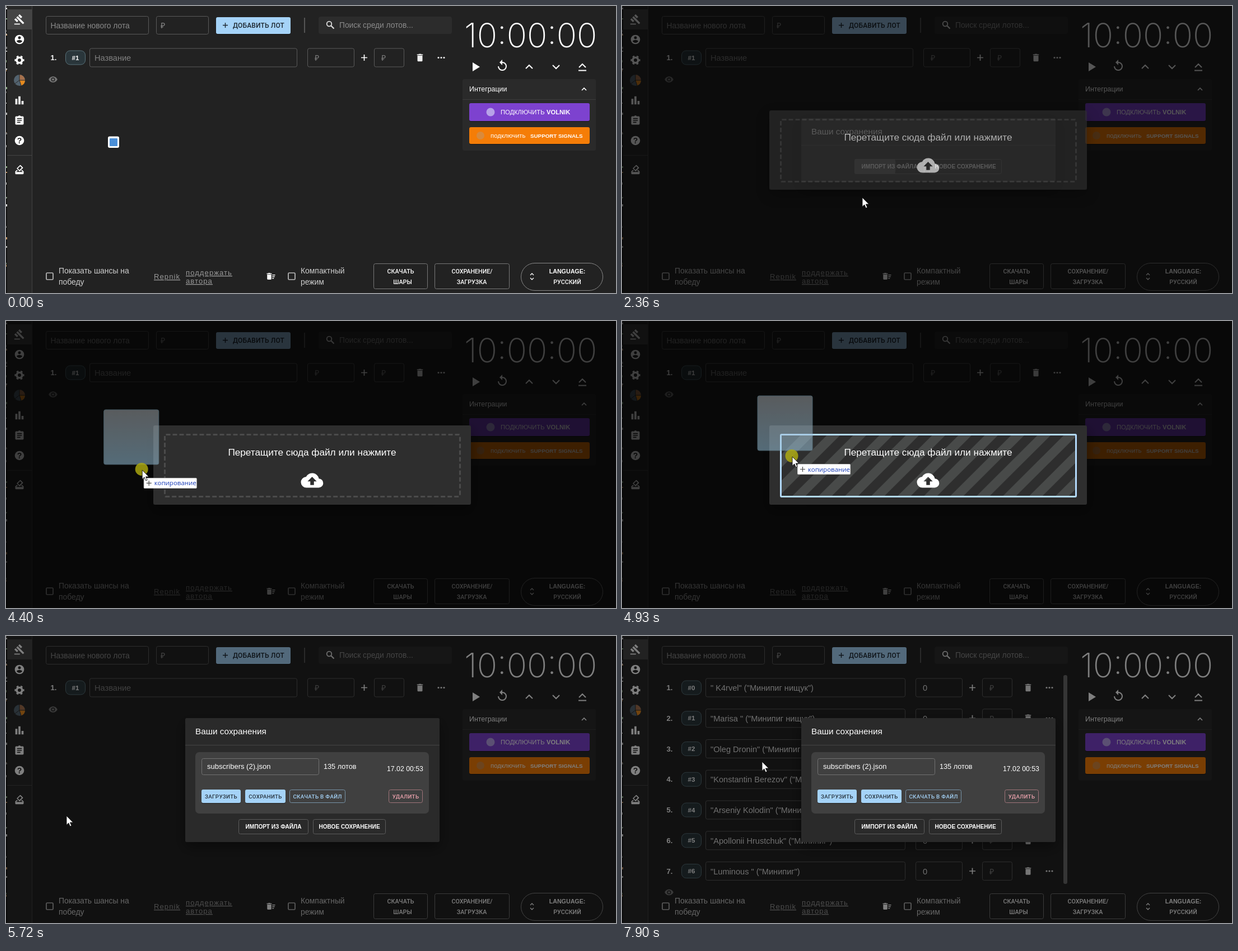
Recreate the animation shown at these times as an HTML page. Size 1089 px wide and 514 px high, loop 8 s.

```html
<!DOCTYPE html>
<html lang="ru">
<head>
<meta charset="utf-8">
<title>Аукцион</title>
<style>
html, body { margin: 0; width: 100%; height: 100%; overflow: hidden; background: #222; }
svg { display: block; width: 1089px; height: 514px; }
text { font-family: "Liberation Sans", Arial, sans-serif; white-space: pre; }
.caps { font-family: Roboto, sans-serif; font-weight: 500; }
.bold { font-weight: 700; }
.thin { font-family: Inter, sans-serif; font-weight: 200; }
.tip { font-family: "Open Sans", sans-serif; }
</style>
</head>
<body>
<svg id="stage" viewBox="0 0 1089 514"></svg>
<script>
const LOOP = 8000;
const BLUE = '#a5d3f8';

// ---------- drawing helpers ----------
const box = (x, y, x2, y2, r, fill, stroke = 'none', more = '') =>
  `<rect x="${x}" y="${y}" width="${x2 - x}" height="${y2 - y}" rx="${r}" fill="${fill}" stroke="${stroke}" ${more}/>`;
const raised = (x, y, x2, y2, fill) =>
  box(x, y + 1.5, x2, y2 + 1.5, 3, '#000', 'none', 'opacity=".3"') + box(x, y, x2, y2, 3, fill);
const frame = (x, y, x2, y2, color = '#5a5a5a', r = 3) =>
  box(x + .5, y + .5, x2 - .5, y2 - .5, r, 'none', color);
const text = (x, y, s, size, fill = '#fff', cls = '', more = '') =>
  `<text x="${x}" y="${y}" font-size="${size}" fill="${fill}" class="${cls}" ${more}>${s}</text>`;
const mid = (x, y, s, size, fill, cls = 'caps', more = '') =>
  text(x, y, s, size, fill, cls, `text-anchor="middle" ${more}`);
const icon = (cx, cy, d, size = 20, fill = '#fff') =>
  `<path transform="translate(${cx - size / 2} ${cy - size / 2}) scale(${size / 24})" d="${d}" fill="${fill}"/>`;
const line = (d, stroke = '#fff', w = 2) =>
  `<path d="${d}" fill="none" stroke="${stroke}" stroke-width="${w}"/>`;
const dot = (x, y, r, fill, more = '') => `<circle cx="${x}" cy="${y}" r="${r}" fill="${fill}" ${more}/>`;
const group = (id, body, more = '') => `<g id="${id}" ${more}>${body}</g>`;
const plus = (x, y, color = '#fff', r = 5.5, w = 1.7) =>
  line(`M${x - r} ${y}h${2 * r}M${x} ${y - r}v${2 * r}`, color, w);

const ICONS = {
  gavel: 'M1 21h12v2H1zM5.2 8.1l2.9-2.9 14.1 14.2-2.8 2.8zM12.3 1l5.7 5.7-2.9 2.8-5.6-5.7zM3.8 9.5l5.7 5.6-2.8 2.9L1 12.3z',
  user: 'M12 2a10 10 0 1 0 0 20 10 10 0 0 0 0-20zm0 3a3 3 0 1 1 0 6 3 3 0 0 1 0-6zm0 14.2c-2.5 0-4.7-1.3-6-3.2 0-2 4-3.1 6-3.1s6 1.1 6 3.1c-1.3 1.9-3.5 3.2-6 3.2z',
  bars: 'M4 9h4v11H4zM10 4h4v16h-4zM16 13h4v7h-4z',
  clip: 'M19 3h-4.2a3 3 0 0 0-5.6 0H5a2 2 0 0 0-2 2v14c0 1.1.9 2 2 2h14a2 2 0 0 0 2-2V5a2 2 0 0 0-2-2zm-5 14H7v-2h7zm3-4H7v-2h10zm0-4H7V7h10z',
  vote: 'M18 13h-.7l-2 2h1.9l1.8 2H5l1.8-2h2l-2-2H6l-3 3v4c0 1.1.9 2 2 2h14a2 2 0 0 0 2-2v-4zm-1-5l-5 5-3.5-3.5 5-5zm-3.8-5.7L6.7 8.8a1 1 0 0 0 0 1.4l5 5c.4.4 1 .4 1.4 0l6.4-6.4a1 1 0 0 0 0-1.4l-5-5a1 1 0 0 0-1.3-.1z',
  trash: 'M6 19c0 1.1.9 2 2 2h8a2 2 0 0 0 2-2V7H6zM19 4h-3.5l-1-1h-5l-1 1H5v2h14z',
  sweep: 'M15 16h4v2h-4zM15 8h7v2h-7zM15 12h6v2h-6zM3 18c0 1.1.9 2 2 2h6a2 2 0 0 0 2-2V8H3zM14 5h-3l-1-1H6L5 5H2v2h12z',
  eye: 'M12 4.5C7 4.5 2.7 7.6 1 12c1.7 4.4 6 7.5 11 7.5s9.3-3.1 11-7.5c-1.7-4.4-6-7.5-11-7.5zM12 17a5 5 0 1 1 0-10 5 5 0 0 1 0 10zm0-8a3 3 0 1 0 0 6 3 3 0 0 0 0-6z',
  cloud: 'M19.4 10A7.5 7.5 0 0 0 5.4 8 6 6 0 0 0 6 20h13a5 5 0 0 0 .4-10zM14 13v4h-4v-4H7l5-5 5 5z',
  replay: 'M12 5V1L7 6l5 5V7a6 6 0 1 1-6 6H4a8 8 0 1 0 8-8z'
};

// ---------- page ----------
function sidebar() {
  const specks = Array.from({ length: 30 }, (_, i) => {
    const y = (i * 37 + (i * i * 13) % 29) % 500;
    return box(0, y, 1 + i % 2, y + 2 + i % 3, 0, ['#bbb', '#c99a6a', '#8fb08a', '#ddd', '#777'][i % 5]);
  }).join('');
  return box(0, 0, 2, 514, 0, '#111') + specks + box(2, 0, 46, 514, 0, '#282828') +
    box(46, 0, 47, 514, 0, '#424242') + box(2, 6, 46, 42, 0, '#444') +
    icon(24, 24, ICONS.gavel) + icon(24, 60, ICONS.user) +
    dot(24, 97, 4.8, 'none', 'stroke="#fff" stroke-width="3.6"') +
    dot(24, 97, 7.4, 'none', 'stroke="#fff" stroke-width="2.4" stroke-dasharray="3.6 4.149" transform="rotate(-14 24 97)"') +
    dot(24, 133, 10, '#53636f') +
    '<path d="M24 133V123a10 10 0 0 1 10 10z" fill="#a5714d"/><path d="M24 133h10a10 10 0 0 1-7 9.5z" fill="#e58a1f"/>' +
    line('M24 123v10h10M24 133l3 9.5M24 133l-8 6', '#282828', 1) +
    icon(24, 169, ICONS.bars, 22) + icon(24, 205, ICONS.clip) +
    dot(24, 241, 8.3, '#fff') + mid(24, 246, '?', 14, '#282828', 'bold') +
    box(2, 267, 46, 268, 0, '#444') + icon(24, 293, ICONS.vote);
}

function header() {
  return frame(71, 18, 255, 51) + text(79.5, 39.5, 'Название нового лота', 13.8, '#8b8b8b') +
    frame(268, 18, 362, 51) + text(276, 39.5, '₽', 14, '#8b8b8b') +
    raised(375, 20, 508, 50, BLUE) + plus(391.5, 34.5, '#1d2730', 4.5, 1.4) +
    text(405, 38.5, 'ДОБАВИТЬ ЛОТ', 12, '#1d2730', 'caps', 'letter-spacing=".15"') +
    box(532, 21, 534, 48, 0, '#555') + box(558, 19, 796, 50, 4, '#2c2c2c') +
    dot(577, 32, 4.3, 'none', 'stroke="#ddd" stroke-width="1.8"') + line('M580 35l5.5 5.5', '#ddd', 2.2) +
    text(595, 39, 'Поиск среди лотов...', 13.8, '#8b8b8b');
}

function row(i, y, num, name, shift) {
  const x = shift ? -14 : 0;
  return text(79.5, y + 4.5, `${i}.`, 13, '#fff', 'bold') +
    box(106.5, y - 12.5, 141.5, y + 12.5, 8, '#2a363b', '#587078') + mid(124, y + 4, `#${num}`, 11.5, '#fff', 'bold') +
    frame(149, y - 17, 520 + x, y + 17) + text(158, y + 5.5, name || 'Название', 14.6, name ? '#e2e2e2' : '#808080') +
    frame(538 + x, y - 17, 622 + x, y + 17) +
    (name ? text(537, y + 5.5, '0', 14.6, '#e2e2e2') : text(551, y + 5.5, '₽', 14, '#808080')) +
    plus(639.5 + x, y) + frame(657 + x, y - 17, 711 + x, y + 17) + text(670 + x, y + 5.5, '₽', 14, '#808080') +
    icon(739 + x, y, ICONS.trash, 18, '#eee') + [-5, 0, 5].map(d => dot(777 + x + d, y, 1.6, '#eee')).join('');
}

const LOTS = ['" K4rvel" ("Минипиг нищук")', '"Marisa " ("Минипиг нищук")', '"Oleg Dronin" ("Минипиг нищук")',
  '"Konstantin Berezov" ("Минипиг")', '"Arseniy Kolodin" ("Минипиг")', '"Apollonii Hrustchuk" ("Минипиг")', '"Luminous " ("Минипиг")'];

function timer() {
  return text(818, 74, '10:00:00', 60, '#fff', 'thin') +
    '<path d="M833 101v16l13-8z" fill="#fff"/>' + icon(886, 107, ICONS.replay, 24) +
    line('M928 112l6-6 6 6M976 106l6 6 6-6M1023 110l6-6 6 6M1022 115.5h14') +
    box(815, 131, 1053, 259, 3, '#2a2a2a') + text(827, 153, 'Интеграции', 12.4) +
    line('M1028 151l4-4 4 4', '#fff', 1.6) + box(815, 167, 1053, 168, 0, '#3b3b3b') +
    raised(827, 174, 1042, 206, '#7d42cf') + dot(865, 190, 7.5, '#b7a2e8') +
    text(883, 193.5, 'ПОДКЛЮЧИТЬ', 11.2) + text(965, 193.5, 'VOLNIK', 11.2, '#fff', 'bold') +
    raised(827, 217, 1042, 247, '#f57d07') + dot(847, 232, 7, '#d98a3c') +
    text(865, 235.5, 'подключить', 11.4) + text(936, 235.5, 'SUPPORT SIGNALS', 9.8, '#fff', 'bold');
}

function footer() {
  const tick = x => box(x + 1, 478, x + 13, 490, 1.5, 'none', '#bbb', 'stroke-width="1.7"');
  const link = (x, y, s) => text(x, y, s, 13, '#999', '', 'letter-spacing="1.1" text-decoration="underline"');
  const note = (x, y, s) => text(x, y, s, 13.9, '#cfcfcf');
  return tick(71) + note(94, 479, 'Показать шансы на') + note(94, 499, 'победу') +
    link(264, 489, 'Repnik') + link(321, 482, 'поддержать') + link(321, 497, 'автора') +
    icon(473, 484, ICONS.sweep, 18) + tick(503) + note(526, 479, 'Компактный') + note(526, 499, 'режим') +
    group('saveRipple', '', 'clip-path="url(#saveClip)"') +
    frame(656, 461, 753, 507, '#777') + mid(704.5, 479, 'СКАЧАТЬ', 10.7, '#fff') + mid(708, 498, 'ШАРЫ', 10.7, '#fff') +
    frame(765, 461, 899, 507, '#777') + mid(832, 479, 'СОХРАНЕНИЕ/', 10.7, '#fff') + mid(831.5, 498, 'ЗАГРУЗКА', 10.7, '#fff') +
    frame(919, 460, 1066, 510, '#888', 24.5) + line('M936 482l3-3 3 3M936 487l3 3 3-3', '#fff', 1.4) +
    mid(1002, 479, 'LANGUAGE:', 10.7, '#fff', 'bold') + mid(1002, 498, 'РУССКИЙ', 10.7, '#fff');
}

// ---------- dialogs ----------
const outlined = (x, y, x2, s) => frame(x, y, x2, y + 27, '#5c5c5c') + mid((x + x2) / 2, y + 17, s, 10.1, '#fff', 'bold');

function saves(y, y2, body) {
  return box(320, y, 774, y2, 3, '#2b2b2b', 'none', 'filter="url(#shade)"') + text(338, y + 29, 'Ваши сохранения', 15.3) +
    box(320, y + 48, 774, y + 49, 0, '#444') + body +
    outlined(415, y2 - 41, 540, 'ИМПОРТ ИЗ ФАЙЛА') + outlined(548, y2 - 41, 678, 'НОВОЕ СОХРАНЕНИЕ');
}

function savedCard() {
  const label = (x, s, fill) => mid(x, 290.5, s, 9.7, fill, 'caps', 'letter-spacing=".35"');
  return box(338, 208, 755, 318, 7, '#404040') + frame(349, 219, 559, 249, '#717171') +
    text(359, 238, 'subscribers (2).json', 13) + text(567, 238, '135 лотов', 12.7) + text(680, 242, '17.02 00:53', 12.3) +
    raised(349, 275, 419, 299, BLUE) + group('loadRipple', '', 'clip-path="url(#loadClip)"') + label(384, 'ЗАГРУЗИТЬ', '#26323c') +
    raised(427, 275, 499, 299, BLUE) + label(463, 'СОХРАНИТЬ', '#26323c') +
    frame(506, 275, 606, 299, '#7793a8') + label(556, 'СКАЧАТЬ В ФАЙЛ', BLUE) +
    frame(683, 275, 744, 299, '#a0747a') + label(713.5, 'УДАЛИТЬ', '#eda3ae');
}

function dropZone() {
  const stripes = Array.from({ length: 16 }, (_, i) => `M${200 + i * 47} 316h23.5l114-114h-23.5z`).join('');
  return box(263, 187, 830, 329, 3, '#2d2d2d', 'none', 'filter="url(#shade)"') +
    group('idle', box(283.5, 203.5, 810.5, 314.5, 2, 'none', '#4b4b4b', 'stroke-width="3" stroke-dasharray="8 4"')) +
    group('active', `<g clip-path="url(#zoneClip)"><path id="stripes" d="${stripes}" fill="#484a49"/></g>` +
      box(283.5, 203.5, 810.5, 314.5, 1.5, 'none', '#b3dafc', 'stroke-width="3"')) +
    mid(546.5, 241, 'Перетащите сюда файл или нажмите', 17.2, '#fff', '') + icon(546.5, 285.5, ICONS.cloud, 39);
}

const clip = (id, ...r) => `<clipPath id="${id}">${box(...r, 3, '#fff')}</clipPath>`;
const shadeRect = id => box(0, 0, 1089, 514, 0, '#000', 'none', `id="${id}"`);

document.getElementById('stage').innerHTML =
  `<defs>${clip('saveClip', 765, 461, 899, 507)}${clip('loadClip', 349, 275, 419, 299)}` +
  `${clip('importClip', 415, 274, 540, 301)}${clip('zoneClip', 283, 203, 811, 315)}` +
  '<linearGradient id="file" x2="0" y2="1"><stop stop-color="#a3a9ad"/><stop offset="1" stop-color="#9cc7df"/></linearGradient>' +
  '<filter id="shade" x="-10%" y="-30%" width="120%" height="170%"><feDropShadow dx="0" dy="9" stdDeviation="12" flood-opacity=".4"/></filter></defs>' +
  box(0, 0, 1089, 514, 0, '#222') + sidebar() + header() + timer() +
  group('blank', row(1, 92.5, 1, '', false) + icon(84, 131.5, ICONS.eye, 17, '#757575')) +
  group('list', LOTS.map((n, i) => row(i + 1, 92.5 + i * 54.75, i, n, true)).join('') +
    box(788, 70, 795, 444, 3, '#6a6a6a') + icon(84, 459, ICONS.eye, 17, '#757575')) +
  footer() + group('badge', box(182, 233.5, 202, 254, 3, '#fff') + box(185, 237, 199, 251, 1, '#4a8fd8')) +
  shadeRect('dim1') + group('empty', saves(201, 315, group('importRipple', '', 'clip-path="url(#importClip)"'))) +
  group('full', saves(147, 369, savedCard())) +
  shadeRect('dim2') + group('drop', dropZone()) +
  group('drag', box(-62, -109, 36, -11, 3, 'url(#file)', '#7fa9bd', 'opacity=".52"')) +
  group('press', dot(-1, -1.5, 11.5, '#b0ac10', 'opacity=".82"')) +
  group('hint', box(9.5, 13.5, 103.5, 31.5, 1, '#fff', '#ccc') + plus(18.5, 22.5, '#444', 4.5, 1.2) +
    text(28, 26.5, 'копирование', 11.5, '#1c3fb8', 'tip')) +
  group('cursor', '<path d="M0 0v16.5l3.8-3.6 2.6 6 2.6-1.1-2.6-5.8h5.4z" fill="#fff" stroke="#111" stroke-width=".9"/>');

// ---------- motion ----------
const el = Object.fromEntries([...document.querySelectorAll('#stage [id]')].map(e => [e.id, e]));
const clamp = v => Math.max(0, Math.min(1, v));
const out = p => 1 - (1 - p) ** 2;
const smooth = p => p * p * (3 - 2 * p);
const fade = (t, start, ms) => out(clamp((t - start) / ms));

const POINTER = [[480, -14, 300], [1240, 803, 470], [1480, 803, 470], [2020, 432, 287], [2250, 432, 287],
  [2360, 429, 343], [2620, 300, 525]];
const CARRY = [[4110, -60, 312], [4400, 243, 267], [4700, 290, 248], [4900, 304, 243]];
const RETURN = [[5230, 304, 243], [5720, 108, 322], [5800, 98, 317], [6520, 388, 283], [7560, 388, 283], [7900, 250, 225]];

function along(path, t, ease) {
  let i = 1;
  while (i < path.length - 1 && path[i][0] < t) i++;
  const [a, b] = [path[i - 1], path[i]];
  const p = ease(clamp((t - a[0]) / (b[0] - a[0])));
  return [a[1] + (b[1] - a[1]) * p, a[2] + (b[2] - a[2]) * p];
}

const show = (e, on) => { e.style.display = on ? '' : 'none'; };
const alpha = (e, v) => { e.style.opacity = v; show(e, v > 0); };
const place = (e, [x, y]) => e.setAttribute('transform', `translate(${x} ${y})`);

function ripple(e, t, start, x, y, r, color) {
  const grow = clamp((t - start) / 550), gone = clamp((t - start - 200) / 550);
  const on = t >= start && gone < 1;
  e.innerHTML = on ? dot(x, y, r * (.25 + .75 * out(grow)), color, `opacity="${.21 * (1 - gone)}"`) : '';
}

function render(t) {
  const open = fade(t, 1310, 225);
  const zone = t < 5060 ? fade(t, 2270, 225) : 1 - fade(t, 5060, 195);
  const loaded = t >= 7000, saved = t >= 5140;
  const dragging = t >= 4120 && t < 5060, inside = t >= 4720 && t < 5060;

  show(el.badge, t < 480);
  show(el.blank, !loaded);
  show(el.list, loaded);
  alpha(el.dim1, open * .5);
  alpha(el.empty, saved ? 0 : open);
  show(el.full, saved);
  alpha(el.dim2, zone * .5);
  alpha(el.drop, zone);
  show(el.idle, !inside);
  show(el.active, inside);
  place(el.stripes, [((t - 4720) * .035) % 47, 0]);

  ripple(el.saveRipple, t, 1280, 803, 470, 75, '#fff');
  ripple(el.importRipple, t, 2150, 428, 287, 85, '#fff');
  ripple(el.loadRipple, t, 6770, 388, 285, 55, '#17415f');

  const tip = t < 4100 ? along(POINTER, t, smooth) : t < 5230 ? along(CARRY, t, p => p) : along(RETURN, t, smooth);
  const trail = along(CARRY, t - 7, p => p);
  show(el.cursor, (t >= 480 && t < 1290) || (t >= 1520 && t < 2640) || t >= 4120);
  place(el.cursor, tip);
  place(el.press, tip);
  place(el.drag, trail);
  place(el.hint, trail);
  for (const e of [el.drag, el.press, el.hint]) show(e, dragging);
}

const began = performance.now();
function tick() {
  render((performance.now() - began) % LOOP);
  requestAnimationFrame(tick);
}
render(0);
tick();
</script>
</body>
</html>
```
